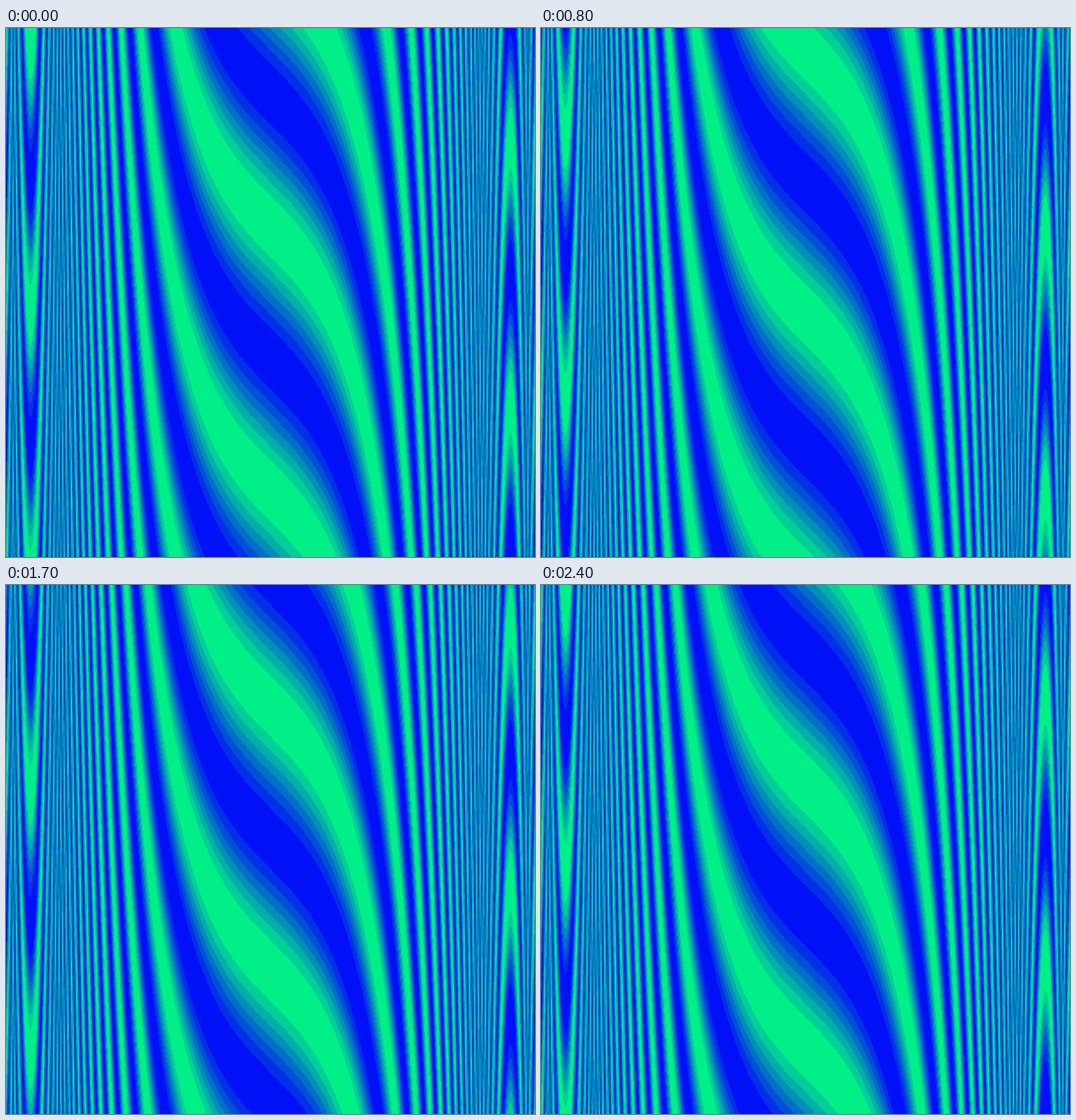
Write an HTML page with a canvas that moves like this. It is 600x600 px and loops after 2500 ms.

```html
<!DOCTYPE html>
<html lang="en">
<head>
<meta charset="utf-8">
<title>Travelling sinh wave</title>
<style>
  html, body { margin: 0; width: 100%; height: 100%; overflow: hidden; }
  canvas { display: block; width: 600px; height: 600px; }
</style>
</head>
<body>
<canvas id="stage" width="600" height="600"></canvas>
<script>
const SIZE = 600, SAMPLES = 300, BANDS = 8;
const STEP_MS = 100, STEPS = 25, TAU = 2 * Math.PI;

const ctx = document.getElementById('stage').getContext('2d');
const image = ctx.createImageData(SIZE, SIZE);
const pixels = new Uint32Array(image.data.buffer);

// Flat colour bands from blue to spring green, packed as ABGR.
const palette = Uint32Array.from({ length: BANDS }, (_, band) => {
  const green = 16 + 32 * band;
  const blue = 255 - green / 2;
  return (255 << 24 | blue << 16 | green << 8) >>> 0;
});

// The field sin(y + sinh(x) + t) is sampled on a coarse grid over
// [-TAU, TAU]; the outer stripes get their shape from that sampling.
const phaseAt = i => Math.sinh(-TAU + 2 * TAU * i / (SAMPLES - 1));
const mix = (a, b, f) => a + (b - a) * f;

const columnCos = new Float64Array(SIZE);
const columnSin = new Float64Array(SIZE);
for (let px = 0; px < SIZE; px++) {
  const pos = (px + 0.5) / SIZE * (SAMPLES - 1);
  const i = Math.floor(pos);
  const left = phaseAt(i), right = phaseAt(i + 1);
  columnCos[px] = mix(Math.cos(left), Math.cos(right), pos - i);
  columnSin[px] = mix(Math.sin(left), Math.sin(right), pos - i);
}

function draw(step) {
  const shift = TAU * step / (STEPS - 1);
  let k = 0;
  for (let py = 0; py < SIZE; py++) {
    const angle = TAU - 2 * TAU * (py + 0.5) / SIZE + shift;
    const s = Math.sin(angle), c = Math.cos(angle);
    for (let px = 0; px < SIZE; px++) {
      const value = s * columnCos[px] + c * columnSin[px];
      const band = Math.floor((value + 1) * BANDS / 2);
      pixels[k++] = palette[Math.max(0, Math.min(BANDS - 1, band))];
    }
  }
  ctx.putImageData(image, 0, 0);
}

const start = performance.now();
let shown = -1;

function tick() {
  const step = Math.floor((performance.now() - start) / STEP_MS) % STEPS;
  if (step !== shown) draw(shown = step);
  requestAnimationFrame(tick);
}
tick();
</script>
</body>
</html>
```
